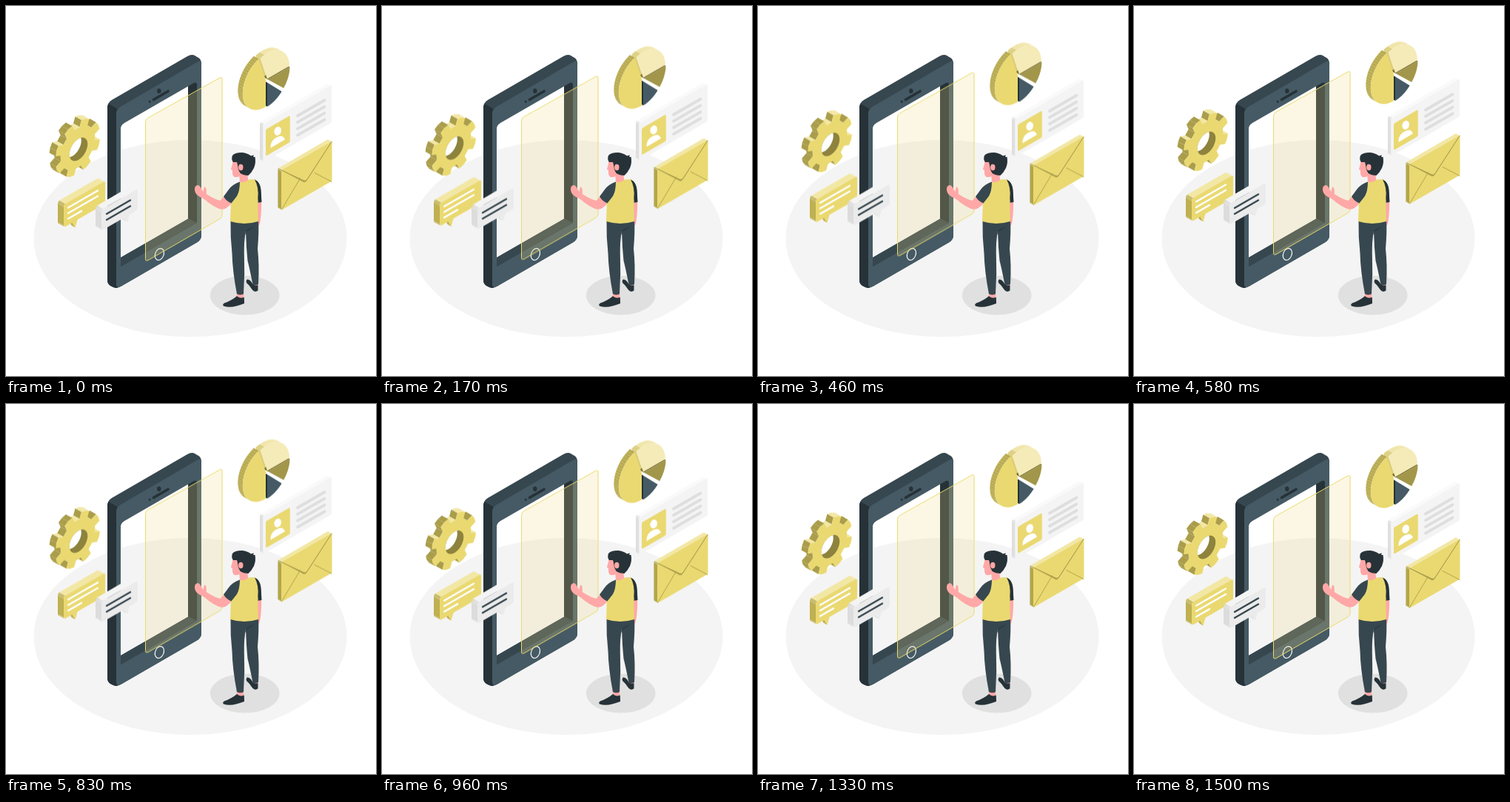
Animation, 500 px wide and 500 px high, one loop 1540 ms. Source, as an HTML page:

```html
<!DOCTYPE html>
<html lang="en">
<head>
<meta charset="utf-8">
<title>Isometric app screen</title>
<style>
  html, body { margin: 0; width: 100%; height: 100%; overflow: hidden; background: #fff; }
  svg { display: block; width: 100vw; height: 100vh; }
  .line { fill: none; stroke-linecap: round; stroke-linejoin: round; }
</style>
</head>
<body>
<svg viewBox="0 0 500 500">
  <defs>
    <path id="opening" d="M155 166Q155 161 160 158L246 108.500V287.300L155 339.500Z"/>
    <clipPath id="screen"><use href="#opening"/></clipPath>
  </defs>
  <ellipse id="floor" cx="249" cy="314" rx="211.500" ry="133" fill="#f4f4f4"/>
  <ellipse cx="322.700" cy="391" rx="46.800" ry="26.500" fill="#e0e0e0"/>

  <g id="phone">
    <path fill="#37474f" d="M137 138Q137 130.500 143 127L245 68Q251 64.500 256 67.500L261 70.500Q264 73 264 78V310Q264 316 258 319.500L156 378.500Q150 382 145 380L141 378Q137 375.500 137 370Z"/>
    <path fill="#263238" d="M137 138Q137 134.500 138.500 132L150.500 139Q149 142 149 146V374Q149 379.500 151.500 380.800Q148 381.500 145 380L141 378Q137 375.500 137 370Z"/>
    <path fill="#455a64" d="M149 146Q149 139.500 155 136L258 76Q264 72.500 264 79V310Q264 316 258 319.500L156 378.500Q149 382.500 149 375Z"/>
    <path fill="#263238" d="M155 166Q155 161 160 158L253 104.500Q258 101.500 258 107V293L155 352Z"/>
    <path fill="#37474f" d="M155 339L246 287L258 293L155 352Z"/>
    <use href="#opening" fill="#fff"/>
    <use href="#floor" clip-path="url(#screen)"/>
    <ellipse cx="206.800" cy="114.800" rx="2.700" ry="3.200" fill="#263238"/>
    <path class="line" stroke="#263238" stroke-width="3.600" d="M199.500 126.500L219 115.200"/>
    <ellipse cx="194.200" cy="129.300" rx="1.400" ry="1.700" fill="#263238"/>
    <ellipse cx="207.400" cy="335.500" rx="5.700" ry="8.200" transform="rotate(22 207.400 335.500)" fill="none" stroke="#f4f4f4" stroke-width="1.200"/>
  </g>

  <g id="float">
    <path fill="#f0d884" fill-opacity=".22" stroke="#eada6c" d="M188.500 157.500Q188.500 153.500 191.500 151.500L289 97Q292 95.500 292 99V283Q292 286 289 287.800L192 343.600Q188.500 345.400 188.500 341.500Z"/>
  </g>

  <g id="man">
    <path fill="#ffa8a7" d="M340 262L345 262Q345.500 278 343.500 291Q342.500 298 340 297Z"/>
    <path fill="#263238" d="M336 235Q343 237 344.500 248L345.500 265L339 266Z"/>
    <path fill="#ffa8a7" d="M311.500 386H321.500L321 395Q315 398 312 393ZM333 374H340.500L340 381H333Z"/>
    <path fill="#263238" d="M312 392Q316 396 321.800 393.500L322 402Q316 404 311 405.500Q302 408 294 405.500Q292 403.500 295 401.500Q305 398 312 392ZM326 369.500Q330 369 333.500 376Q337 379 340.500 377V384.500Q336 388 332.500 383Q329 377.500 325 374Q324 370.500 326 369.500Z"/>
    <path fill="#37474f" d="M303.500 289H341Q342 306 340 328Q342.500 350 341 376Q337 378.500 333.500 376.500Q329.500 356 326.500 344Q324.500 325 324 304Q321.500 318 321.800 334Q323 362 321 389Q317 391.500 312 389Q306 358 305.500 334Q303 312 303.500 289Z"/>
    <path class="line" stroke="#263238" d="M323.800 308Q324 304 326 303Q330 302 333 299"/>
    <path fill="#ffa8a7" d="M296 256L305 266Q298 275 292 274.800Q286 274.500 274 266Q266 259 262 258Q256 255 255 249Q254.500 242.500 259 242Q262 242 264.500 248L267 251Q266.500 245 269 244.500Q271.500 246 270.800 254Q281 261 289.500 263Z"/>
    <path fill="#ead971" d="M315 238Q328 233 337 234.500Q341 240 341 252Q340 270 341 291Q322 297 303 291L304 262Q307 245 315 238Z"/>
    <path fill="#37474f" d="M316 237.500Q306 241 301 248L294 257.500Q298 264 304.500 266.500L312 257Q316 250 316 237.500Z"/>
    <path fill="#263238" d="M336 234.500Q342 237 344 246L344.800 262Q341.500 264 340.500 261Q342 245 336 234.500Z"/>
    <path fill="#ffa8a7" d="M315 226H326.500L327 235.500Q322 239 316 238Z"/>
    <path fill="#ffa8a7" d="M306.500 207Q306.500 214 304 220Q304 221.500 306 222Q305.500 230 309 231.200Q314 232 317 229L325 222L323 208Z"/>
    <path fill="#263238" d="M307 211Q304 207 306 202Q309 198 319 198Q326 198.500 331 202.500L335 201.500L334 204L336.500 204Q338 212 335 219Q332 225 327.500 229Q321 229 316.500 226L314 221Q313 214 312 211Z"/>
    <ellipse cx="317.300" cy="218" rx="3.200" ry="4.200" fill="#ffa8a7"/>
  </g>
</svg>
<script>
const float = document.getElementById('float');
const add = markup => float.insertAdjacentHTML('beforeend', markup);
const poly = (pts, fill) => `<path fill="${fill}" d="M${pts.map(p => p.map(n => n.toFixed(2))).join('L')}Z"/>`;
const rad = deg => deg * Math.PI / 180;

// Polar point (clockwise from the top) on the isometric wall plane
const wall = (cx, cy, u, v) => [cx + .866 * u, cy - .5 * u + v];
const polar = (cx, cy, r, deg) => wall(cx, cy, r * Math.sin(rad(deg)), -r * Math.cos(rad(deg)));

// Visible side faces of a clockwise outline pushed back up and to the left
function sides(pts, dx, dy, side, top) {
  return pts.map((a, i) => {
    const b = pts[(i + 1) % pts.length], ex = b[0] - a[0], ey = b[1] - a[1];
    const shown = -ey * dx + ex * dy > .01;
    return { shown, a, b, lit: ex > .8 * Math.hypot(ex, ey), key: -(a[0] + b[0]) * dx - (a[1] + b[1]) * dy };
  }).filter(e => e.shown).sort((p, q) => p.key - q.key).map(({ a, b, lit }) =>
    poly([a, b, [b[0] - dx, b[1] - dy], [a[0] - dx, a[1] - dy]], lit ? top : side)).join('');
}
const solid = (pts, dx, dy, front, side, top) => add(sides(pts, dx, dy, side, top) + poly(pts, front));

// Rounded panel; x, y is the top left corner, w and h are on-screen sizes
function panel(x, y, w, h, r) {
  const W = w / .866, pts = [];
  [[W - r, r, 0], [W - r, h - r, 90], [r, h - r, 180], [r, r, 270]].forEach(([u, v, start]) => {
    for (let k = 0; k <= 6; k++) {
      const a = rad(start + k * 15);
      pts.push(wall(x, y, u + r * Math.sin(a), v - r * Math.cos(a)));
    }
  });
  return pts;
}
const strokes = (x0, rows, color, width) => add(rows.map(([y, x1]) =>
  `<path class="line" stroke="${color}" stroke-width="${width}" d="M${x0} ${y}L${x1} ${y - (x1 - x0) * .577}"/>`).join(''));

function gear(cx, cy) {
  const pts = [];
  for (let i = 0; i < 8; i++) {
    const mid = 20 + i * 45;
    [[27, -14], [35, -10.5], [35.4, 0], [35, 10.5], [27, 14]].forEach(([r, a]) => pts.push(polar(cx, cy, r, mid + a)));
  }
  solid(pts, 8.5, 4.8, '#ead971', '#aa9d4b', '#f2e7a4');
  const tilt = (x, y) => `transform="matrix(.866 -.5 0 1 ${x} ${y})"`;
  add(`<clipPath id="hole"><circle r="14.2" ${tilt(cx + 1, cy + 2)}/></clipPath>
    <g clip-path="url(#hole)"><circle r="15" fill="#8d833d" ${tilt(cx + 1, cy + 2)}/>
    <circle r="14.2" fill="#fff" ${tilt(cx - 7.5, cy - 2.8)}/></g>`);
}

function pie() {
  const slices = [
    [353, 98.5, 34.5, -18, 90, '#f5ebb8', '#dccd7c', '#efe3a3'],
    [354, 99.5, 34, 90, 134, '#a2964a', '#7b7134', '#7b7134'],
    [353, 103.5, 32.5, 136, 180, '#455a64', '#263238', '#263238'],
    [351, 100.3, 36, 180, 342, '#ead971', '#b9ab51', '#b9ab51']
  ].map(([x, y, r, from, to, ...colors]) => {
    const pts = [[x, y]];
    for (let k = 0; k <= 30; k++) pts.push(polar(x, y, r, from + (to - from) * k / 30));
    return { pts, colors };
  });
  slices.forEach(s => add(sides(s.pts, 6.5, 3.75, s.colors[1], s.colors[2])));
  slices.forEach(s => add(poly(s.pts, s.colors[0])));
}

function card() {
  solid(panel(347.5, 160, 92.5, 51, 2), 4.5, 2.6, '#f4f4f4', '#dfdfdf', '#fafafa');
  add(poly(panel(351, 167, 32.8, 36, 2), '#ead971'));
  add(`<ellipse cx="367.200" cy="169" rx="4.700" ry="6" transform="rotate(18 367.200 169)" fill="#fff"/>
    <path fill="#fff" d="M357.500 192Q357 183 364 178.500Q374 172 377 180.500Z"/>`);
  strokes(394, [148.5, 157.2, 165.9, 174.6].map(y => [y, 430.5]), '#dedede', 3.8);
}

function envelope() {
  solid(panel(372, 222, 68.5, 54, 1.5), 4.6, 2.6, '#ead971', '#b3a54c', '#f2e7a4');
  add(`<path class="line" stroke="#b3a54c" d="M372.500 275L397.500 233M440 237.500L417 225.500"/>
    <path fill="#b3a54c" d="M372 222L402 236Q405 237 407 234L440.500 183L406 236.500Q404.500 239 402 238Z"/>
    <path class="line" stroke="#a3954a" d="M372.500 222L402 236Q405 237.500 407 234.500L440 183.500"/>`);
}

function bubble(x, y, w, h, tail, front, side, top) {
  solid(tail, 5, 2.9, front, side, side);
  solid(panel(x, y, w, h, 3), 8, 4.4, front, side, top);
}

gear(97, 191.7);
pie();
card();
envelope();
bubble(78, 268.5, 56, 31, [[88, 290], [98, 284], [93.5, 299.5]], '#ead971', '#bfb052', '#f2e7a4');
strokes(84, [[272.5, 124], [280, 124], [287.5, 102]], '#fff', 2.4);
bubble(129, 275.3, 49, 28.5, [[156, 284], [168, 278], [164, 292]], '#ebebeb', '#dcdcdc', '#f4f4f4');
strokes(136, [[281, 168], [289, 168]], '#37474f', 2.4);

float.animate(
  [{ transform: 'translateY(0px)' }, { transform: 'translateY(-8.8px)' }],
  { duration: 770, delay: -50, direction: 'alternate', iterations: Infinity, easing: 'cubic-bezier(.37, 0, .63, 1)' }
);
</script>
</body>
</html>
```
